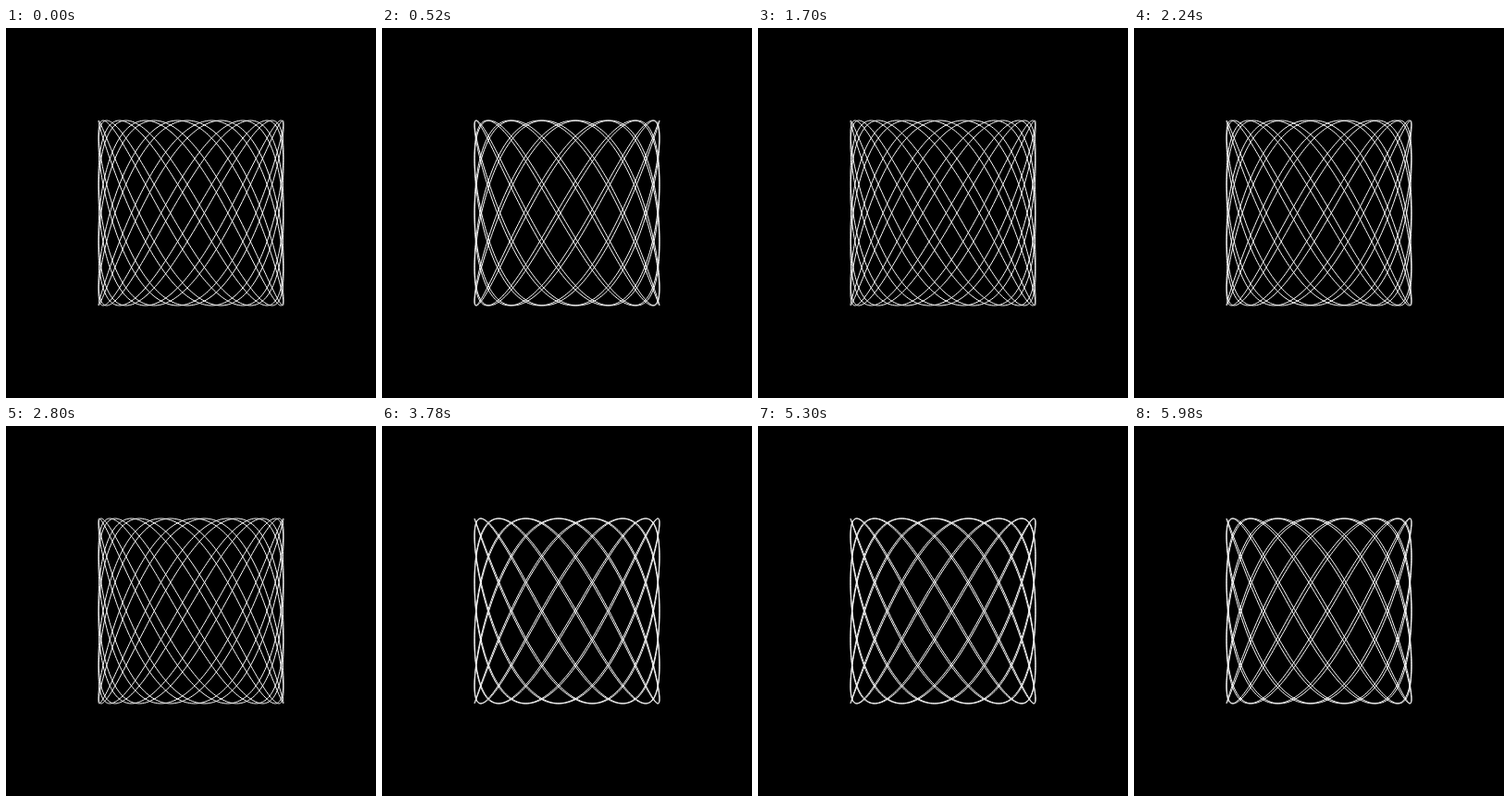
Recreate the animation shown at these times as an HTML page with a canvas. Size 400 px wide and 400 px high, loop 6000 ms.

```html
<!DOCTYPE html>
<html lang="en">
<head>
<meta charset="utf-8">
<title>Lissajous curve</title>
<style>
html, body { margin: 0; width: 100%; height: 100%; overflow: hidden; background: #000; }
canvas { display: block; }
</style>
</head>
<body>
<canvas id="stage" width="400" height="400"></canvas>
<script>
const ctx = document.getElementById("stage").getContext("2d");
const LOOP = 6000, TICK = 20;
const CENTER = 200, RADIUS = 100;
const FREQ_X = 10, FREQ_Y = 17;
const STEPS = 3000;
const PHASE_START = 0.04, PHASE_STEP = 0.01;

function draw(phase) {
  ctx.fillStyle = "#000";
  ctx.fillRect(0, 0, 400, 400);
  ctx.strokeStyle = "#fff";
  ctx.lineWidth = 1;
  ctx.lineJoin = "round";
  ctx.beginPath();
  for (let i = 0; i < STEPS; i++) {
    const u = i / STEPS * Math.PI * 2;
    ctx.lineTo(
      CENTER + RADIUS * Math.sin(FREQ_X * u + phase),
      CENTER + RADIUS * Math.sin(FREQ_Y * u)
    );
  }
  ctx.closePath();
  ctx.stroke();
}

const start = performance.now();

function frame() {
  const time = Math.max(0, performance.now() - start) % LOOP;
  draw(PHASE_START + PHASE_STEP * Math.floor(time / TICK));
  requestAnimationFrame(frame);
}
frame();
</script>
</body>
</html>
```
